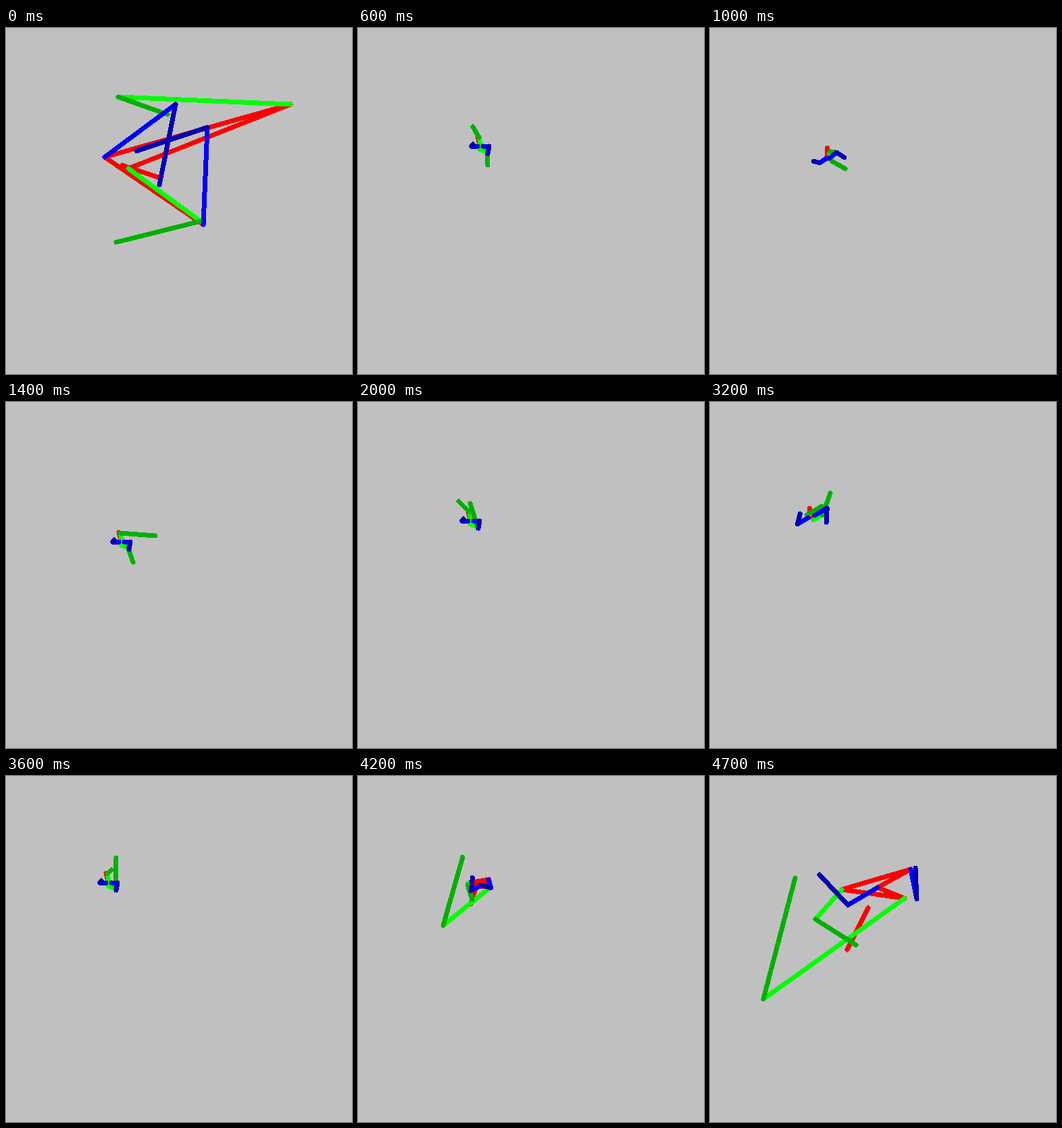
An HTML page that plays this animation: 512 by 512 pixels, repeating every 4800 ms.

```html
<!DOCTYPE html>
<html>
<head>
<meta charset="utf-8">
<style>
  html, body { margin: 0; height: 100%; overflow: hidden; background: #c0c0c0; }
  svg { display: block; width: 100vw; height: 100vh; }
  path { fill: none; stroke-width: 7; stroke-linecap: round; shape-rendering: crispEdges; }
</style>
</head>
<body>
<svg viewBox="0 0 512 512"></svg>
<script>
const LOOP = 4800, STEP = 100;

// Joints are flat x, y pairs: two shoulders, two hips, (elbow, wrist) x2,
// (knee, ankle) x2, head top and base.
const spreadStart = [
  146, 191, 292, 291, 421, 113, 181, 208,
  251, 113, 227, 232, 298, 147, 193, 182,
  166, 102, 239, 128, 288, 286, 163, 317, 172, 203, 228, 222
];
const spreadEnd = [
  297, 138, 248, 165, 195, 168, 288, 181,
  306, 182, 304, 136, 204, 191, 162, 146,
  156, 212, 216, 250, 79, 330, 126, 151, 234, 195, 203, 257
];

// A small curled-up figure around (x, y); only the feet are placed freely.
function curled(x, y, foot1, foot2) {
  const pair = place => [...place(-1), ...place(1)];
  const shoulder = s => [x + 4 * s, y];
  const hip = s => [x, y + 1 + 4 * s];
  const arm = s => [x + 13 * s, y, x + 11 * s, y + 4 + 7 * s];
  const leg = s => [x + 4 + 6 * s, y - 2 + 11 * s, ...(s < 0 ? foot1 : foot2)];
  return [...pair(shoulder), ...pair(hip), ...pair(arm), ...pair(leg), x - 4, y - 14, x, y];
}

const poses = [
  { time: 0, joints: spreadStart },
  { time: 600, joints: curled(181, 175, [170, 146], [192, 203]) },
  { time: 1400, joints: curled(171, 207, [221, 198], [188, 237]) },
  { time: 2000, joints: curled(167, 176, [149, 147], [166, 150]) },
  { time: 2700, joints: curled(152, 184, [202, 167], [172, 168]) },
  { time: 3600, joints: curled(152, 158, [156, 139], [163, 121]) },
  { time: 4700, joints: spreadEnd }
];

const bones = {
  '#f00': [[0, 1], [2, 3], [0, 2], [1, 3], [12, 13]],
  '#0f0': [[2, 8], [3, 10]],
  '#00b000': [[8, 9], [10, 11]],
  '#00f': [[0, 4], [1, 6]],
  '#0000b0': [[4, 5], [6, 7]]
};

const svg = document.querySelector('svg');
const layers = Object.entries(bones).map(([color, pairs]) => {
  const path = document.createElementNS('http://www.w3.org/2000/svg', 'path');
  path.setAttribute('stroke', color);
  svg.append(path);
  return { path, pairs };
});

// The figure collapses fast at the start and bursts open at the end.
function ease(segment, u) {
  if (segment === 0) return 1 - (1 - u) ** 3;
  if (segment === poses.length - 2) return u * u;
  return u * u * (3 - 2 * u);
}

function jointsAt(time) {
  const next = Math.max(1, poses.findIndex(p => p.time >= time));
  const from = poses[next - 1], to = poses[next];
  const u = (time - from.time) / (to.time - from.time);
  const k = ease(next - 1, u);
  return from.joints.map((v, i) => {
    const reach = i >= 8 && i < 24 ? 12 : 3;
    const sway = reach * Math.sin(Math.PI * u) * Math.sin(i * 2.4 + next * 1.7 + u * 5);
    return v + (to.joints[i] - v) * k + sway;
  });
}

function draw(now) {
  const p = jointsAt(Math.floor(now % LOOP / STEP) * STEP);
  const at = j => p[2 * j].toFixed(2) + ' ' + p[2 * j + 1].toFixed(2);
  for (const { path, pairs } of layers) {
    path.setAttribute('d', pairs.map(([a, b]) => `M${at(a)}L${at(b)}`).join(''));
  }
}

const start = performance.now();
function tick() {
  draw(performance.now() - start);
  requestAnimationFrame(tick);
}
tick();
</script>
</body>
</html>
```
